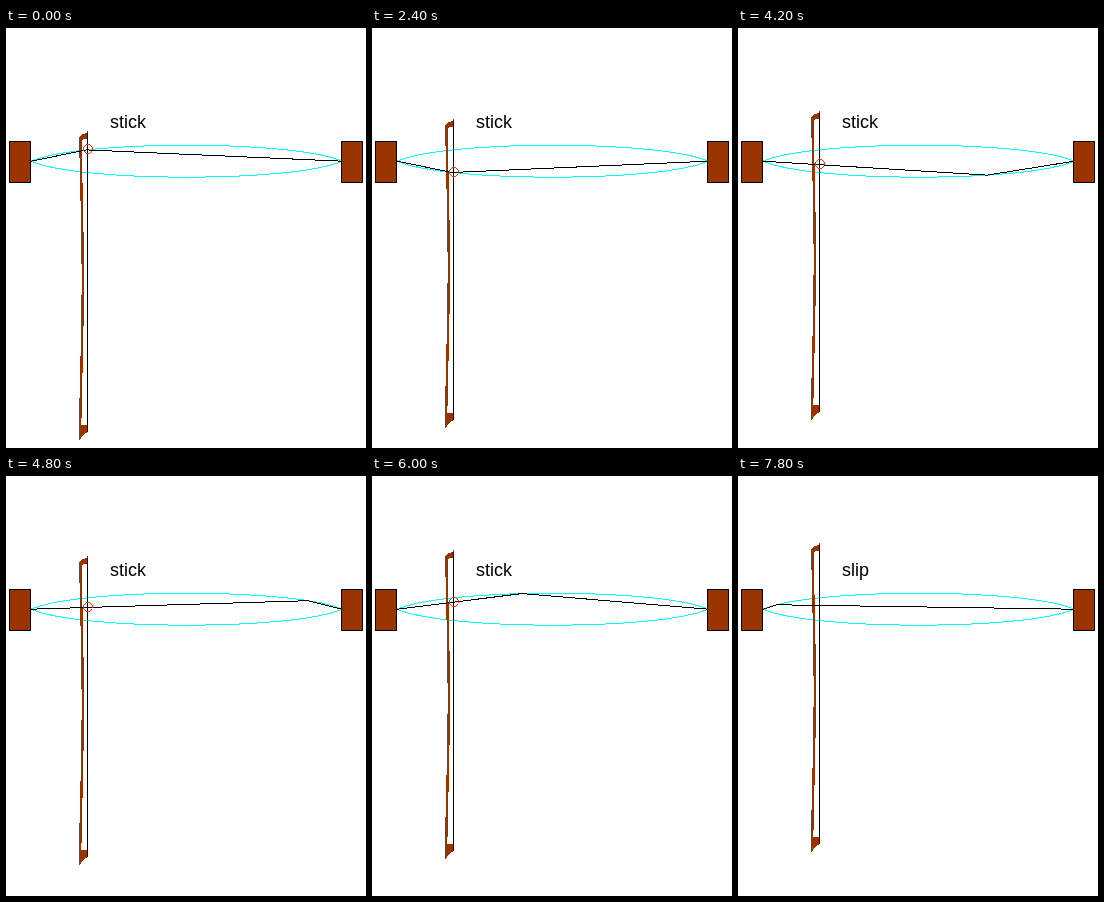
Animation, 360 px wide and 420 px high, one loop 8 s. Source, as an HTML page:

```html
<!DOCTYPE html>
<html lang="en">
<head>
<meta charset="utf-8">
<title>Bowed string: stick and slip</title>
<style>
  html, body { margin: 0; width: 100%; height: 100%; overflow: hidden; background: #fff; }
  svg { display: block; width: 360px; height: 420px; }
  text { font: 18px "Liberation Sans", Arial, sans-serif; }
</style>
</head>
<body>
<svg viewBox="0 0 360 420" shape-rendering="crispEdges" fill="none" stroke-width="1">
  <path id="envelope" stroke="#0ff"/>
  <g id="bow">
    <path stroke="#930" stroke-width="2.4" d="M74.3 109C75 150 76.8 200 76.8 252C76.8 310 74.5 360 74 411"/>
    <path fill="#930" d="M82 102L81 105L76 106.500L73 109.500V112H76L77 111H82Z"/>
    <path fill="#930" d="M74 397H82V404L78 406L75 409L74 412H73Z"/>
    <path stroke="#000" d="M81.500 105V404"/>
  </g>
  <g fill="#930" stroke="#000">
    <rect x="3.500" y="113.500" width="21" height="41"/>
    <rect x="335.500" y="113.500" width="21" height="41"/>
  </g>
  <path id="string" stroke="#000"/>
  <circle id="contact" cx="82" r="4.300" stroke="#f30"/>
  <text id="label" x="104" y="100" fill="#000"></text>
</svg>
<script>
const STEP = 200, STEPS = 40, PERIOD = 35;
const LEFT = 25, RIGHT = 336, LENGTH = RIGHT - LEFT, REST = 133.2;
const HANDLE = 49, HEIGHT = 64 / 3;            // Bezier handles of the envelope
const BOW_X = 56, REACH = 11.4, DRAG = 0.88;   // contact distance, amplitude, stick speed
const SLIP_END = 12, TURN = 23;

const el = id => document.getElementById(id);
const arc = side => `M${LEFT} ${REST}c${HANDLE} ${side * HEIGHT} ${LENGTH - HANDLE} ${side * HEIGHT} ${LENGTH} 0`;
el('envelope').setAttribute('d', arc(-1) + arc(1));

function envelopePoint(t) {
  const s = 1 - t;
  return {
    x: 3 * t * s * s * HANDLE + 3 * t * t * s * (LENGTH - HANDLE) + t ** 3 * LENGTH,
    y: 3 * t * s * HEIGHT
  };
}

// Where a line of this slope from one end of the string meets the envelope.
function meetEnvelope(slope) {
  let low = 0, high = 1;
  for (let i = 0; i < 30; i++) {
    const mid = (low + high) / 2, p = envelopePoint(mid);
    if (p.y > slope * p.x) low = mid; else high = mid;
  }
  return envelopePoint(low);
}

// Displacement of the string under the bow, positive downwards.
function contactOffset(phase) {
  if (phase <= SLIP_END) return REACH * (phase - 6) / 6;
  return phase <= TURN
    ? REACH - DRAG * (phase - SLIP_END)
    : DRAG * (PERIOD - phase) - REACH;
}

function draw(step) {
  const phase = step % PERIOD;
  const slipping = phase > 0 && phase < SLIP_END;
  const offset = contactOffset(phase);
  const corner = meetEnvelope(Math.abs(offset) / (slipping ? LENGTH - BOW_X : BOW_X));
  const cornerX = slipping ? RIGHT - corner.x : LEFT + corner.x;
  const cornerY = REST + Math.sign(offset) * corner.y;
  const rise = Math.round(0.965 * step - 0.225 * Math.max(0, step - 30));

  el('string').setAttribute('d', `M${LEFT} ${REST}L${cornerX} ${cornerY}L${RIGHT} ${REST}`);
  el('bow').setAttribute('transform', `translate(0 ${-rise})`);
  el('contact').setAttribute('cy', Math.round(REST + offset - 0.3));
  el('contact').setAttribute('visibility', slipping ? 'hidden' : 'visible');
  el('label').textContent = slipping ? 'slip' : 'stick';
}

const start = performance.now();
function tick() {
  draw(Math.floor((performance.now() - start) / STEP) % STEPS);
  requestAnimationFrame(tick);
}
tick();
</script>
</body>
</html>
```
